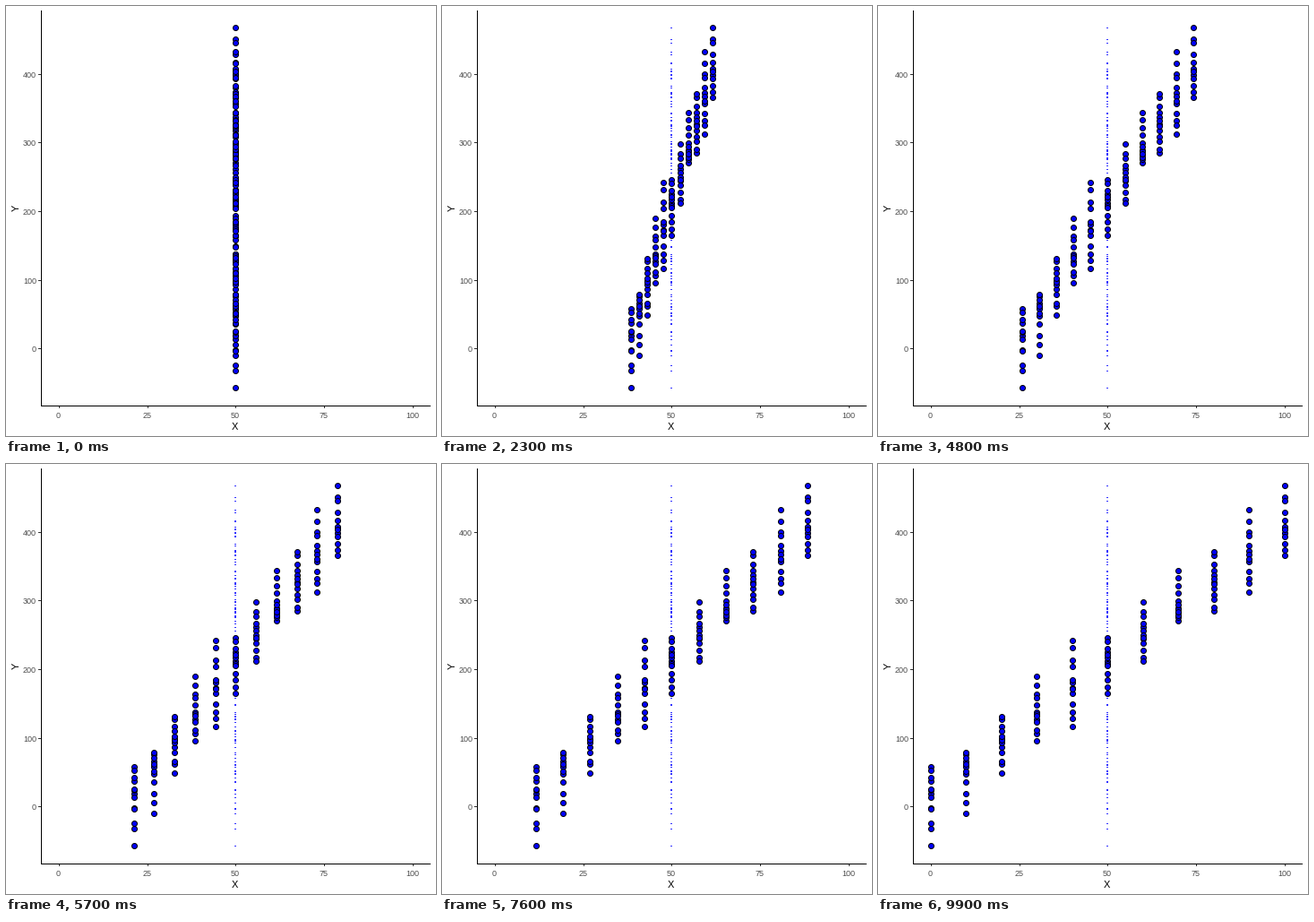
A matplotlib script that plays this animation: 480 by 480 pixels, repeating every 10 s.

```python
import matplotlib.pyplot as plt
import numpy as np
from matplotlib.animation import FuncAnimation
from matplotlib.patches import Rectangle

SIZE = 480
FRAMES = 100
MID_X, HALF = 256.42, 197.5
ZERO_Y, UNIT_Y = 382.2, 0.766

PER_GROUP = 13
# Range of Y at X = 0, 10, ..., 100
LOWS = [-57, -10, 49, 96, 117, 165, 212, 270, 285, 312, 366]
HIGHS = [58, 79, 131, 190, 242, 246, 298, 344, 371, 433, 467]

plt.rcParams["font.family"] = "Liberation Sans"
fig = plt.figure(figsize=(SIZE / 72, SIZE / 72), dpi=72, facecolor="white")
ax = fig.add_axes([0, 0, 1, 1])
ax.set(xlim=(0, SIZE), ylim=(SIZE, 0))
ax.axis("off")


def box(x, y, w, h, color):
    ax.add_patch(Rectangle((x, y), w, h, fc=color, lw=0, antialiased=False))


def to_y(value):
    return np.round(ZERO_Y - UNIT_Y * value)


def draw_axes():
    box(39, 5, 1, 442, "black")
    box(39, 446, 435, 1, "black")
    label = dict(fontsize=9, color="#4d4d4d", va="baseline")
    for v in range(0, 401, 100):
        y = to_y(v)
        box(36, y, 3, 1, "#333333")
        ax.text(34, y + 4, str(v), ha="right", **label)
    for v in range(0, 101, 25):
        x = round(MID_X + (v / 50 - 1) * HALF)
        box(x, 447, 1, 2, "#333333")
        ax.text(x - 0.5, 460, str(v), ha="center", **label)
    ax.text(255.5, 473, "X", fontsize=11, ha="center", va="baseline")
    ax.text(12, 225.5, "Y", fontsize=11, ha="center", va="center", rotation=90)


def make_points(rng):
    """Scatter each group around a linear trend, denser near the trend."""
    points = []
    for i, (low, high) in enumerate(zip(LOWS, HIGHS)):
        trend = 19 + 38.6 * i
        u = np.linspace(-1, 1, PER_GROUP)
        u[1:-1] += rng.uniform(-0.08, 0.08, PER_GROUP - 2)
        reach = np.where(u > 0, high - trend, trend - low)
        values = trend + np.sign(u) * reach * np.abs(u) ** 1.4
        points += [(i / 5 - 1, v) for v in values]
    return rng.permutation(points).T


offsets, values = make_points(np.random.default_rng(4))
ys = to_y(values)

draw_axes()
for y in ys:
    box(255, y, 2, 1, "#3333ff")
dots, = ax.plot([], [], "o", ms=6, mfc="blue", mec="black", mew=1,
                antialiased=False, zorder=3)


def update(frame):
    spread = HALF * frame / (FRAMES - 1)
    dots.set_data(np.round(MID_X + offsets * spread), ys)
    return dots,


anim = FuncAnimation(fig, update, frames=FRAMES, interval=100,
                     repeat=True, repeat_delay=0, blit=True)
plt.show()
```
